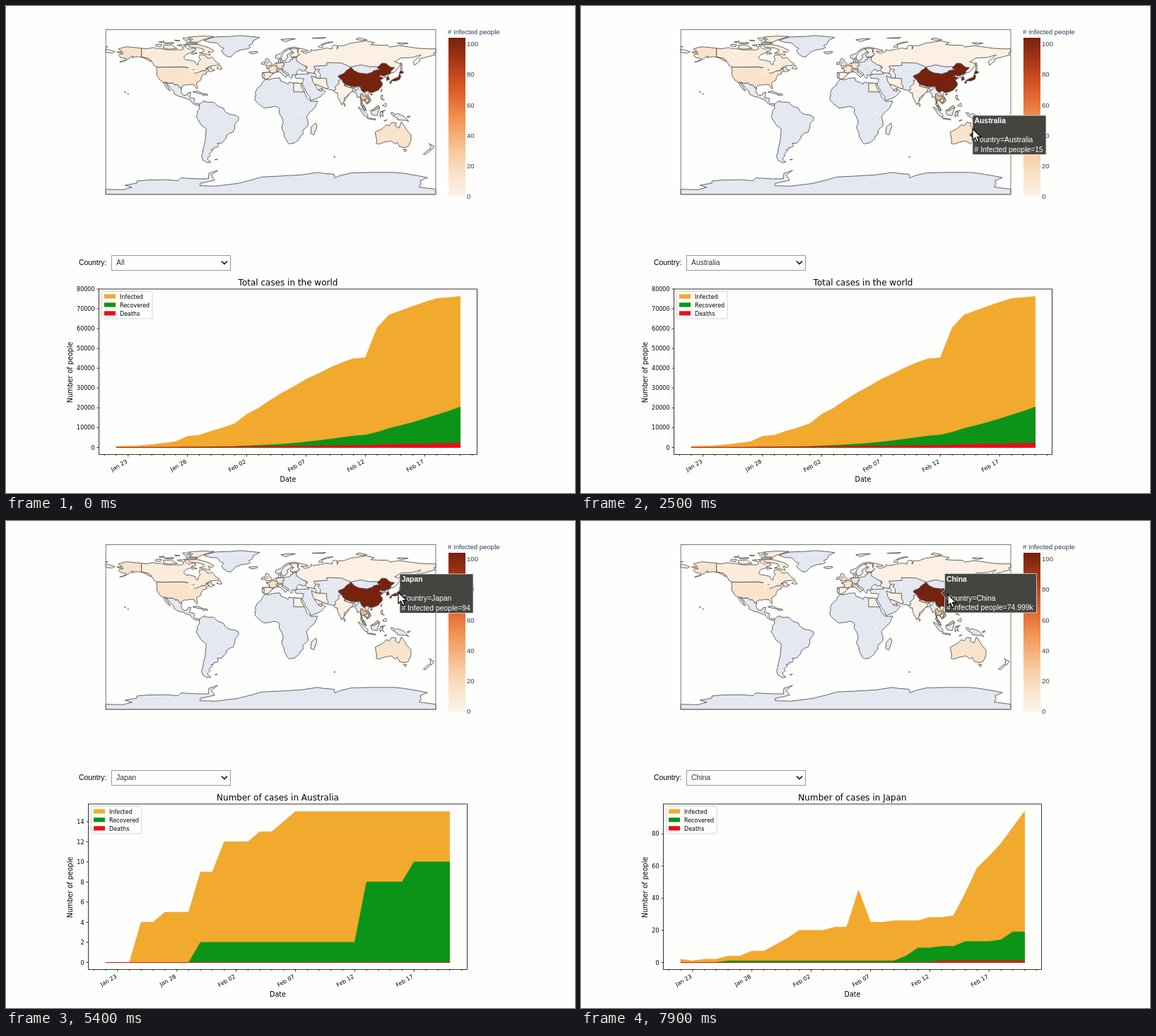
Recreate the animation shown at these times as an HTML page. Size 805 px wide and 690 px high, loop 8000 ms.

```html
<!DOCTYPE html>
<html lang="en">
<meta charset="utf-8">
<title>Infection dashboard</title>
<style>
  html, body { margin: 0; width: 100%; height: 100%; overflow: hidden; background: #fefefc; }
  svg { display: block; }
  text { font: 8px "DejaVu Sans", sans-serif; }
  .ui { font: 10.4px "Liberation Sans", sans-serif; }
  .scale text { font: 9.6px "Liberation Sans", sans-serif; fill: #2a3f5f; }
  .map path { stroke: #4a4a4a; stroke-width: .85; stroke-linejoin: round; vector-effect: non-scaling-stroke; }
  .map .lake path { stroke: none; }
</style>
<svg width="805" height="690" viewBox="0 0 805 690">
  <defs><linearGradient id="heat" x1="0" y1="1" x2="0" y2="0"></linearGradient></defs>

  <!-- Paths are longitude and latitude in degrees -->
  <g class="map" transform="translate(374.5 150.2) scale(1.297 -1.297)">
    <g fill="#e3e8f1">
      <path d="M-117.1 32.5,-114.8 32.5,-111 31.4,-106.5 31.8,-104.5 29.6,-101.5 29.8,-99.2 26.5,-97.2 25.9,-97.8 22.5,-96 19,-94.4 18.2,-91 18.7,-90.3 21,-87 21.5,-88 18,-88.7 15.8,-83.3 15,-83.7 11,-81.5 9,-79.5 9.5,-77.3 8.5,-78 7.3,-80.3 7.3,-83 8.3,-85.7 10,-87.6 13,-92 14.5,-95 16,-100 17,-105.5 20,-105.5 22.5,-109.3 26,-113 31,-114.7 31.7,-111 25.7,-109.5 23,-112 24.7,-115 28z"/>
      <path d="M-77.3 8.5,-75 11,-71.7 12.2,-71.5 11,-68 10.7,-62 10.7,-60 8.4,-57 6,-51.5 4.2,-50 1,-48 -1,-44 -2.7,-40 -3,-35.3 -5.3,-35 -8.5,-39 -13,-39.2 -17.5,-41 -22,-44.7 -23.2,-48.5 -26,-48.7 -28.5,-53.5 -34,-58.3 -34.2,-57 -36.5,-58 -38.2,-62 -39,-62.3 -40.8,-65 -41,-63.6 -42.6,-67.3 -45.8,-65.8 -47.5,-69 -50.5,-68.3 -52.4,-65.2 -54.7,-69 -55.4,-74 -52.5,-75.5 -48,-74 -44,-73.5 -39.5,-71.5 -32,-70.3 -18.5,-76 -14,-79.5 -8,-81.3 -5,-80 -2.5,-80 1,-77.5 4,-78 7.3z"/>
      <path d="M-73 78.3,-66 76,-58.5 75.5,-55 71.5,-51 69.5,-53.5 67,-52 64,-48 61,-43.5 60,-41.5 62.5,-38 65.6,-32 68,-25 69,-22 70.5,-24 72.5,-20 74.5,-19 78,-12 81.4,-22 82.5,-33 83.5,-45 82.5,-60 82,-67 80.3z"/>
      <path d="M-6 35.8,-2 35.1,3 36.8,10 37.3,11 33.8,15.3 32.3,19 30.3,20 32.7,25 31.7,31 31.5,34.2 31.2,32.7 29.8,35.5 24,37.3 20.8,39.5 15.4,43.2 12.4,43.3 11.5,51.2 11.9,48 4.4,42 -1,39 -5,40.6 -10.8,40.6 -15,35 -20,35.4 -24,32.7 -26,31 -29.8,26 -33.8,20 -34.8,18.3 -33,15 -27,14.4 -22.5,11.8 -17.5,13.7 -11,12.2 -6,9 -.8,9.8 3.2,8.5 4.7,4.5 6.3,-2 4.9,-7.5 4.4,-13 8.8,-16.7 12.4,-17.5 14.7,-16.2 19,-17 21,-14.5 26,-9.8 29.7,-9.7 31.5z"/>
      <path d="M30.8 69.6,25 71,18 69.5,13 66,11 64,5.5 62,5.3 59,8 58,10.5 59.3,12.8 55.5,16.4 56.6,19 60,17.3 61.5,21.3 64.5,24 65.8,25.3 65,21.3 62,22.5 60,28 60.5,28 59.5,23.5 59.2,24 57.2,21.5 57.4,21 55.2,18.5 54.7,14 54,11 54,10.5 57.5,8.2 57,8.7 54,5 53.3,2.5 51,-1.5 48.7,-4.7 48.3,-1.2 46,-1.5 43.4,-9 43,-9.4 38.7,-8.8 37,-5.6 36,-2 36.8,0 39.5,3.2 42.2,3 43.2,7.5 43.8,10 44,12.3 41.7,16 38,18.4 40.2,16 41.9,12.4 44.3,13.7 45.6,19.4 41.8,19.5 40,22.5 36.5,24 38,23 40.4,26 40.8,29 41.2,28 43.5,31 46.5,33.5 46,34 44.5,37 45.3,39.2 47.1,36 55,33 62z"/>
      <path d="M41.5 41.5,36 41.5,31.5 41.2,29 41.2,26.3 39.5,27.5 36.8,30.6 36.7,36 36.3,35.5 33.5,34.3 31.3,34.9 29.5,39.2 21,42.8 16.3,43.5 12.7,45 12.9,52 15.6,55.3 17.6,59.8 22.5,56.4 24.5,56 26,54 24.1,51.5 24.6,50 26.7,48 30,50 30,57 27,61.5 25.2,68.8 23.5,72.7 21,77.5 8,80 11.5,87 21.4,91.8 22.4,94.3 18,94.3 16,97.5 16.5,98.5 11,98.3 8,101.3 2.9,104 1.4,103.4 4.5,100.3 8.5,99.3 11,100 13.3,102.5 12,105 8.7,109 11.5,109.2 13,105.8 19,108 21.6,120 35,130.6 42.5,130 50,60 56,45 50,44 44,40 43.4z"/>
      <path d="M-180 -84.4,-161.5 -84.9,-151.5 -82.3,-159 -80,-146 -77.7,-146 -75.4,-135 -74.3,-114 -74,-101 -75,-98 -72,-80 -73,-68 -73,-67.5 -67,-58 -63.8,-61 -66,-65 -69,-61 -74.5,-77 -78,-77 -80.5,-60 -81,-36 -78,-20 -74,-10 -71,10 -70,33 -68.7,51 -66,57 -67,69 -68,70 -72,75 -69.7,88 -66.5,110 -66,135 -66,145 -67,160 -69.5,171 -71.7,163 -75,164 -78.5,162 -82,180 -84.4,180 -90,-180 -90z"/>
      <path d="M49.3 -12,50.4 -15.7,47 -25,43.7 -23.5,44.4 -16.2z"/>
      <path d="M172.7 -34.5,178.5 -37.7,175.3 -41.6,173.8 -39.2,174.8 -36.8zM172.7 -40.6,174.3 -41.7,169 -46.6,166.5 -46z"/>
      <path d="M131 -.8,134 -.9,135 -3.3,138 -1.7,145 -4.4,147 -6.5,150.7 -10.5,147 -9,143 -9,138 -8.3,138.5 -6.8,133 -4zM148.5 -5.6,152 -4,151 -6z"/>
      <path d="M109 1.5,111.5 2.6,117 7,119 5,117.5 1,116 -4,110.2 -2.9zM95.3 5.6,98 4.2,104 -1,106 -3,105.8 -5.8,102 -4zM105.2 -6.8,108.5 -6.7,114.4 -7.8,114.5 -8.7,106.4 -7.4z"/>
      <path d="M119.8 .5,125 1.6,120.4 .2,123.3 -.9,121.5 -2,123 -5,121 -3,119.5 -5.5,119 -3zM124 -10,127 -8.5,123.5 -9.5z"/>
      <path d="M124.3 39.9,130.6 42.4,127.5 39.4,128.4 38.5,126.7 37.7,125 38z"/>
      <path d="M-24 65.5,-15 66.2,-14 65,-19 63.5,-22.5 64zM-10 52,-6.3 52.3,-6 55,-9.8 54zM11 79,16 76.8,21 78.5,27 80,18 80z"/>
      <path d="M-85 22,-80 23,-74.3 20.2,-77.5 20zM-74.3 19.8,-70 19.9,-68.4 18.5,-74 18.3zM-61 -52,-58 -51.5,-59 -52.3zM69 -48.8,70.3 -49.2,69 -49.6z"/>
    </g>
    <g fill="#fbf0e3">
      <path d="M30.8 69.6,33 69.4,41 67.3,40 66.2,33 66.5,37.5 63.9,40 64.6,44 66.2,44 68.4,46.5 67,54 68.4,61 69.9,67 68.8,66.7 71,69 73,72.5 72.5,72.5 68.5,74 72.5,80 72.5,87 75.2,104 77.7,113 75.8,109 73.6,119 73,127 73,130 71,140 72.5,152 70.9,160 69.7,170 69,180 69,180 65,177.5 64.7,179.3 62.4,170.3 60,162 58,163 56,156.8 51,155.7 55,164 62.5,154.5 59.5,142 59,135.2 54.8,141.3 53,140.5 50,135 43.4,130.6 42.5,131 45,135 48.4,130.7 48.8,125.5 53,120 52,117.5 49.5,108 49.5,98 51.5,87.5 49.1,77 53.5,61 54,61.5 51,47 50,49 46.4,47.5 43,48.5 41.9,40 43.4,37 45.3,39.2 47.1,40 49.5,34 52,28 56,28 59.5,31.5 62.8,29.5 65z"/>
      <path d="M-180 69,-170 66,-173 64.3,-180 65.2zM142 54,143.5 52,142.8 49,143.5 46.5,142 46,142 50zM52 71,57 70.7,56 73.5,68 76.6,61 76.2,54 73z"/>
      <path d="M96 81,105 79,100 78,93 79.5zM45 80.7,60 81.5,58 80.3zM138 75.5,150 75.2,143 73.5zM-180 71.4,-177.5 71.3,-180 70.9z"/>
      <path d="M77.8 35.5,78.8 32.5,81.5 30.2,80 28.8,84 27.4,88 26.4,92 26.9,97.3 28.2,94 23.9,92.3 23,92 25.2,89.8 25.9,88.7 22,87 21.4,82.3 16.6,80.3 15.5,80 11.5,77.5 8,76 11,73.2 16.5,72.7 21,70.5 20.8,68.8 23.5,71 24.5,70 27.5,74.5 31,74 34.5z"/>
      <path d="M44.5 39.5,49 37.5,54 37,61 36.5,61 31,63 27.2,61.5 25.2,57 27,50 30,48 30,46 33z"/>
      <path d="M25 31.7,31 31.5,34.2 31.2,32.7 29.8,35.5 24,36.9 22,25 22z"/>
      <path d="M-9 43,-1.5 43.4,3.2 42.2,0 39.5,-2 36.8,-5.6 36,-7.4 37.2,-7 41.8,-8.8 42z"/>
      <path d="M7.5 43.8,7 45.8,13.5 46.5,12.4 44.3,16 41.9,18.4 40.2,16 38,12.3 41.7,10 44z"/>
      <path d="M11.3 59,12.8 55.5,16.4 56.6,19 60,17.3 61.5,21.3 64.5,24 65.8,20.5 69,15 66,12 62z"/>
      <path d="M24 65.8,25.3 65,21.3 62,22.5 60,28 60.5,31.5 62.8,29.5 65,29 69.5,20.6 69.1z"/>
      <path d="M80.2 29.6,82 30.2,88 28,88 26.4,84 27.4z"/>
      <path d="M120.6 18.5,122.2 18.4,121.7 14.3,124 13,120.6 13.9,119.9 16.3zM122 7,125.5 9.8,126.4 7,125.5 5.8zM80 9.7,81.8 7.3,80.5 6,79.8 8z"/>
      <path d="M102.5 13.6,105.5 14.5,107.5 14.4,106 11,104 10.5z"/>
    </g>
    <g fill="#faebda">
      <path d="M-141 69.7,-136 69,-133 69.5,-128 70.4,-125 69.5,-120 69.5,-115 68.2,-108 67.8,-103 68,-98 67.8,-95 69,-96 71,-93.5 71.8,-91 69.5,-88 68.5,-85.5 69.7,-81.5 69,-82 67.2,-86 66.2,-87 64.6,-92 63,-94.5 60.5,-94.7 58.8,-92.5 57,-88 56.5,-82.3 55.2,-82 53,-79.5 51.3,-79 54.5,-76.7 57.3,-78.3 60,-77.5 62.4,-73.5 62.4,-70 61,-69.5 59,-66 58.8,-64.5 60.3,-62 57.5,-60 55,-56 52.5,-58.5 51,-66.4 50.2,-71 47,-65 49.2,-64.8 47,-61 45.8,-66 43.6,-67 45,-69 47.4,-71 45.2,-75 45,-79 43.3,-82.5 41.8,-82.5 45.3,-85 46.7,-89.5 48,-95 49.2,-123 49,-127.5 50.8,-128 52.5,-130 55.2,-130.2 56,-134 58.8,-137 59.2,-141 60.3z"/>
      <path d="M-80.5 73.7,-76 72.8,-68 70.5,-62 67,-64 65,-68 66.4,-66 62,-72 63.5,-78 64.5,-73 66,-73 68.3,-78 70,-89 71,-89.5 73.5zM-117 73,-108 73.2,-105 71,-102 69.5,-112 68.5,-117 70z"/>
      <path d="M-125 74,-119 74,-120 71.5,-125.5 72zM-62 82.5,-75 83,-90 81.8,-85 79.5,-89 76.4,-80 76.2,-75 78.5zM-92 76.6,-80 75.6,-80 74.6,-92 74.8zM-117 75.5,-106 76,-106 74.7,-114 74.6zM-96 81,-91 81,-87 79,-94 78.4z"/>
      <path d="M-102 73,-97 73.8,-97 71.6zM-95.5 73.8,-90 73.8,-93 72.2zM-86 65.8,-80.3 64,-86 63zM-59 47.7,-55.5 51.5,-53 47,-55.5 46.9zM-122 76.5,-116 77.5,-118 76zM-105 78.7,-99 78,-104 77.7z"/>
      <path d="M51.6 24.2,56 26,55.5 22.5z"/>
      <path d="M-5.5 50.1,1 51.2,1.5 52.8,-1.5 55,-2 57.6,-5 58.6,-6 56.5,-3 54,-5 52z"/>
    </g>
    <g fill="#f9e3cb">
      <path d="M-141 69.7,-146 70.2,-152 70.8,-156.5 71.3,-162 70.2,-166 68.8,-163.5 67,-162 66.2,-168 65.6,-166 64.5,-161 64.5,-161 63.5,-165 63,-166 61.6,-165 60.5,-162 59,-158 58.6,-157.5 57.5,-161 55.8,-164.8 54.6,-160 55.5,-156 57.5,-153.5 59.2,-151.8 61,-150 61,-151.5 59.3,-148.5 60,-145 60.4,-141 60,-137.5 58.9,-135.5 57.5,-132 55.5,-130 55.2,-130.2 56,-134 58.8,-137 59.2,-141 60.3z"/>
      <path d="M-123 49,-95 49.2,-89.5 48,-85 46.7,-82.5 45.3,-82.5 41.8,-79 43.3,-75 45,-71 45.2,-69 47.4,-67 45,-70.5 43.3,-70 41.7,-74 40.7,-75.8 37.5,-76 35,-81 31.8,-80 27,-80.5 25.2,-82.5 27.5,-83.7 30,-89.5 30,-91 29.3,-94 29.6,-97.3 27.8,-97.2 25.9,-99.2 26.5,-101.5 29.8,-104.5 29.6,-106.5 31.8,-111 31.4,-114.8 32.5,-117.1 32.5,-120.6 34.5,-122.4 37.2,-124.3 40.3,-124 44.5,-124.7 48.3z"/>
      <path d="M-156 20,-155 19.5,-155.6 19zM-159.8 22.2,-157.8 21.3,-158.5 21.6z"/>
      <path d="M114 -22,122 -18,126 -14,129.5 -15,132 -11.3,137 -12.2,135.5 -15,140 -17.6,142.5 -10.7,145.5 -15,149 -20.5,153 -25,153 -31,150 -37.5,146.3 -39,140.5 -38,138 -33,135.8 -34.9,131 -31.5,124 -33,118 -35,115 -34.3,115.7 -31.6zM144.7 -40.7,148.3 -41,147 -43.6z"/>
      <path d="M6 53.5,14 54,15 51,12.5 50,13.7 48.7,13 47.5,7.6 47.6,6 50z"/>
      <path d="M-4.7 48.3,-1.5 48.7,2.5 51,8 49,6 46.2,7.5 43.8,3 43.2,3 42.4,-1.5 43.4,-1.2 46z"/>
      <path d="M102.3 22.4,105.3 23.2,108 21.6,105.8 19,109.2 13,109 11.5,105 8.7,107.5 12.5,107.5 15,103.5 19.2z"/>
    </g>
    <g fill="#f5bd88">
      <path d="M98 19.5,100 20.3,101 17.6,104.7 17.4,105.5 14.5,102.5 13.6,102.5 12,100 13.3,99.3 11,100.3 8.5,102 6.3,100 6.5,98.3 8,99.3 12,98 17z"/>
      <path d="M100.3 6.5,102 6.2,104 1.4,101.3 2.9zM109.6 2,111.5 2.6,117 7,119 5,115.5 3.2,112 1.2zM121.5 25,120.5 22,120.1 23.6z"/>
    </g>
    <g fill="#76220d">
      <path d="M73.7 39.5,80 42.2,82.5 45.3,85.5 47.1,87.5 49.1,91 45.2,96 42.7,105 41.6,111.5 43.7,112 45,119.8 46.7,116 48,117.5 49.5,120 52,121 53.3,125.5 53,130.7 48.8,135 48.4,131 45,130.6 42.5,124.3 39.9,121.3 39,121 40.8,118 39,122.5 37.2,119.3 35,121.8 31.5,121.5 28.5,117 23.6,110.5 21.2,108 21.6,105.3 23.2,101.5 21.3,98.8 24,97.5 28.2,92 27.8,88 28,81.5 30.2,78.8 32.5,78 35.5,74.7 37.2zM108.8 19.8,111 19.8,109.5 18.2z"/>
      <path d="M130.9 34,133 35.5,136.7 37.2,139.4 38.2,140.2 41.2,142 39.5,140.8 35.8,136.8 34zM129.7 33,131.8 33.5,131.3 31.3,130.2 31.3zM140 41.7,141.7 45.4,145.3 43.5,143 42z"/>
      <path d="M126.7 37.7,128.4 38.5,129.4 35.5,126.4 34.4z"/>
    </g>
    <g fill="#fefefc">
      <path d="M49 46.5,53 46.7,53 45,51 44.5,54 41.5,53.9 37,49 37.5,50 40.5,47.5 43z"/>
      <g class="lake">
        <path d="M-92 46.7,-89 48.5,-85 47.8,-84.7 46.6,-88 46.8zM-87.8 42,-86.5 42,-86.3 44.5,-85 46,-88 44.5zM-84 46,-80.5 45.5,-81.7 43.2,-83.5 44zM-83 41.7,-79 42.8,-82 42.5zM-79.5 43.3,-76.5 44,-76.5 43.4z"/>
        <path d="M-124 66,-119 66.5,-121 65zM-116 61,-110 62.8,-113 61.5zM-98.5 53.5,-96.5 51,-97.5 51zM32 0,34 .3,33 -2.5zM58.5 45.5,61 46.3,59.5 44zM104 51.6,109.5 55.3,108 53z"/>
      </g>
    </g>
  </g>
  <rect x="141.2" y="33.5" width="466.8" height="233.3" fill="none" stroke="#777"/>

  <g class="scale" id="scale">
    <rect x="626" y="45" width="24" height="225" fill="url(#heat)"/>
    <text x="625" y="40.2"># Infected people</text>
  </g>

  <text class="ui" x="103" y="367">Country:</text>
  <rect x="149.5" y="353.5" width="168" height="21" fill="none" stroke="#999"/>
  <text class="ui" id="choice" x="156" y="367" fill="#333"></text>
  <path d="M305 361.5l4 4l4-4" fill="none" stroke="#111" stroke-width="1.7"/>

  <g id="charts"></g>
  <g id="tips"></g>
  <path id="cursor" d="M0 0V16L3.7 12.6L6.3 18.6L9 17.4L6.5 11.6H11.5z" fill="#fff" stroke="#000" stroke-width="1.2"/>
</svg>
<script>
const $ = id => document.getElementById(id);
const add = (id, html) => $(id).insertAdjacentHTML('beforeend', html);
const repeat = (...pairs) => pairs.flatMap(([value, count]) => Array(count).fill(value));
const line = (x1, y1, x2, y2) => `<path d="M${x1} ${y1}L${x2} ${y2}" stroke="#000" stroke-width=".8"/>`;

const heat = ['#fbf2e7', '#fae4cd', '#f7d1a9', '#f5b17a', '#f19052', '#e3692f', '#cc4a20', '#9f3415', '#76220d'];
$('heat').innerHTML = heat.map((c, i) => `<stop offset="${i / 8}" stop-color="${c}"/>`).join('');
for (let n = 0; n <= 100; n += 20) add('scale', `<text x="652" y="${273.3 - n * 2.163}">${n}</text>`);

const series = [['Infected', '#f1a92e'], ['Recovered', '#0b9417'], ['Deaths', '#e80d1e']];

function addChart({ title, left, width, unit, step, max, data }) {
  const zero = 625.5, bottom = 635.5, mid = left + width / 2;
  const x = day => +(left + 24.5 + day * 16.78).toFixed(1);
  let out = '';
  data.forEach((values, k) => {
    const top = values.map((v, day) => `${x(day)} ${(zero - v * unit).toFixed(1)}`).join(' ');
    out += `<path d="M${x(0)} ${zero}L${top}L${x(29)} ${zero}z" fill="${series[k][1]}" stroke="${series[k][1]}" stroke-width=".8"/>`;
  });
  out += `<rect x="${left}" y="401" width="${width}" height="234.5" fill="none" stroke="#000" stroke-width=".8"/>`;
  for (let v = 0; v <= max; v += step) {
    const y = zero - v * unit;
    out += line(left - 3, y, left, y) + `<text x="${left - 6}" y="${y + 3}" text-anchor="end">${v}</text>`;
  }
  for (let day = -1; day <= 30; day++) {
    const major = day > 0 && day < 30 && day % 5 === 1;
    out += line(x(day), bottom, x(day), bottom + (major ? 3 : 1.7));
    if (!major) continue;
    const date = 22 + day;
    const label = date > 31 ? 'Feb ' + String(date - 31).padStart(2, '0') : 'Jan ' + date;
    out += `<text transform="translate(${x(day) - .5} 647) rotate(-30)" text-anchor="end">${label}</text>`;
  }
  out += `<text x="${mid}" y="396" text-anchor="middle" style="font-size:12px">${title}</text>
    <text x="${mid}" y="674" text-anchor="middle" style="font-size:9.6px">Date</text>
    <text transform="translate(94 519) rotate(-90)" text-anchor="middle" style="font-size:9.6px">Number of people</text>
    <rect x="${left + 4}" y="404.5" width="71.5" height="38.5" rx="2" fill="#fefefc" stroke="#ccc" stroke-width=".8"/>`;
  series.forEach(([name, color], k) => {
    out += `<rect x="${left + 7.5}" y="${408.3 + k * 12}" width="16" height="6.2" fill="${color}"/>
      <text x="${left + 29.5}" y="${414.6 + k * 12}">${name}</text>`;
  });
  add('charts', `<g>${out}</g>`);
}

addChart({
  title: 'Total cases in the world', left: 131.5, width: 535, unit: .0028075, step: 10000, max: 80000,
  data: [
    [555, 653, 941, 1434, 2118, 2927, 5578, 6166, 8234, 9927, 12038, 16787, 19881, 23892, 27635, 30817, 34391,
      37120, 40150, 42762, 44802, 45221, 60368, 66885, 69030, 71224, 73258, 75136, 75639, 76197],
    [45, 48, 62, 81, 108, 143, 238, 259, 314, 435, 543, 834, 1049, 1344, 1688, 2121, 2730,
      3422, 4150, 4959, 5796, 6268, 7666, 9581, 11061, 12635, 14451, 16359, 18243, 20424],
    [17, 18, 26, 42, 56, 82, 131, 133, 171, 213, 259, 362, 426, 492, 564, 634, 719,
      806, 906, 1013, 1113, 1118, 1371, 1523, 1666, 1770, 1868, 2007, 2122, 2247]
  ]
});
addChart({
  title: 'Number of cases in Australia', left: 116.5, width: 536, unit: 14.25, step: 2, max: 14,
  data: [
    repeat([0, 3], [4, 2], [5, 3], [9, 2], [12, 3], [13, 2], [14, 1], [15, 14]),
    repeat([0, 8], [2, 14], [8, 4], [10, 4]),
    repeat([0, 30])
  ]
});
addChart({
  title: 'Number of cases in Japan', left: 116.5, width: 535, unit: 2.277, step: 20, max: 80,
  data: [
    [2, 1, 2, 2, 4, 4, 7, 7, 11, 15, 20, 20, 20, 22, 22, 45, 25, 25, 26, 26, 26, 28, 28, 29, 43, 59, 66, 74, 84, 94],
    repeat([0, 4], [1, 15], [4, 1], [9, 2], [10, 2], [13, 3], [14, 1], [19, 2]),
    repeat([0, 22], [1, 8])
  ]
});

const tips = [
  { from: 2400, to: 4500, x: 554, y: 155, width: 104, name: 'Australia', count: '15' },
  { from: 5400, to: 7700, x: 557, y: 75, width: 104, name: 'Japan', count: '94' },
  { from: 7900, to: 8000, x: 514.5, y: 74.5, width: 130, name: 'China', count: '74.999k' }
];
for (const { x, y, width, name, count } of tips) {
  add('tips', `<g class="ui" fill="#fff">
    <path d="M${x} ${y}h${width}v55.5h${-width}v-22.9l-5 -4.9l5 -4.9z" fill="#444441" stroke="#e4e4e0" stroke-width=".8"/>
    <text class="ui" x="${x + 2.5}" y="${y + 11}" style="font-weight:bold">${name}</text>
    <text class="ui" x="${x + 2.5}" y="${y + 38.3}">Country=${name}</text>
    <text class="ui" x="${x + 2.5}" y="${y + 51.8}"># Infected people=${count}</text></g>`);
}

// time, x, y
const route = [
  [800, 777, 306], [1400, 672, 325], [1500, 672, 325], [1700, 639, 316], [2400, 565, 192], [2500, 554, 174],
  [4500, 554, 174], [4700, 575, 210], [4900, 650, 180], [5200, 580, 110], [5400, 555, 101],
  [7600, 555, 101], [7900, 519, 104]
];
function cursorAt(t) {
  const next = route.findIndex(stop => stop[0] > t);
  if (next < 0) return route.at(-1).slice(1);
  const [t0, x0, y0] = route[next - 1], [t1, x1, y1] = route[next];
  const k = (t - t0) / (t1 - t0);
  return [x0 + (x1 - x0) * k, y0 + (y1 - y0) * k];
}

const show = (node, visible) => node.setAttribute('display', visible ? 'inline' : 'none');

function draw(now) {
  const t = Math.floor(now % 8000 / 100) * 100;
  const chart = t < 2700 ? 0 : t < 5700 ? 1 : 2;
  [...$('charts').children].forEach((node, i) => show(node, i === chart));
  [...$('tips').children].forEach((node, i) => show(node, t >= tips[i].from && t < tips[i].to));
  $('choice').textContent = tips.findLast(tip => t >= tip.from)?.name ?? 'All';
  show($('cursor'), t >= 800);
  if (t >= 800) $('cursor').setAttribute('transform', `translate(${cursorAt(t)})`);
}

const start = performance.now();
function tick() {
  draw(performance.now() - start);
  requestAnimationFrame(tick);
}
tick();
</script>
</html>
```
